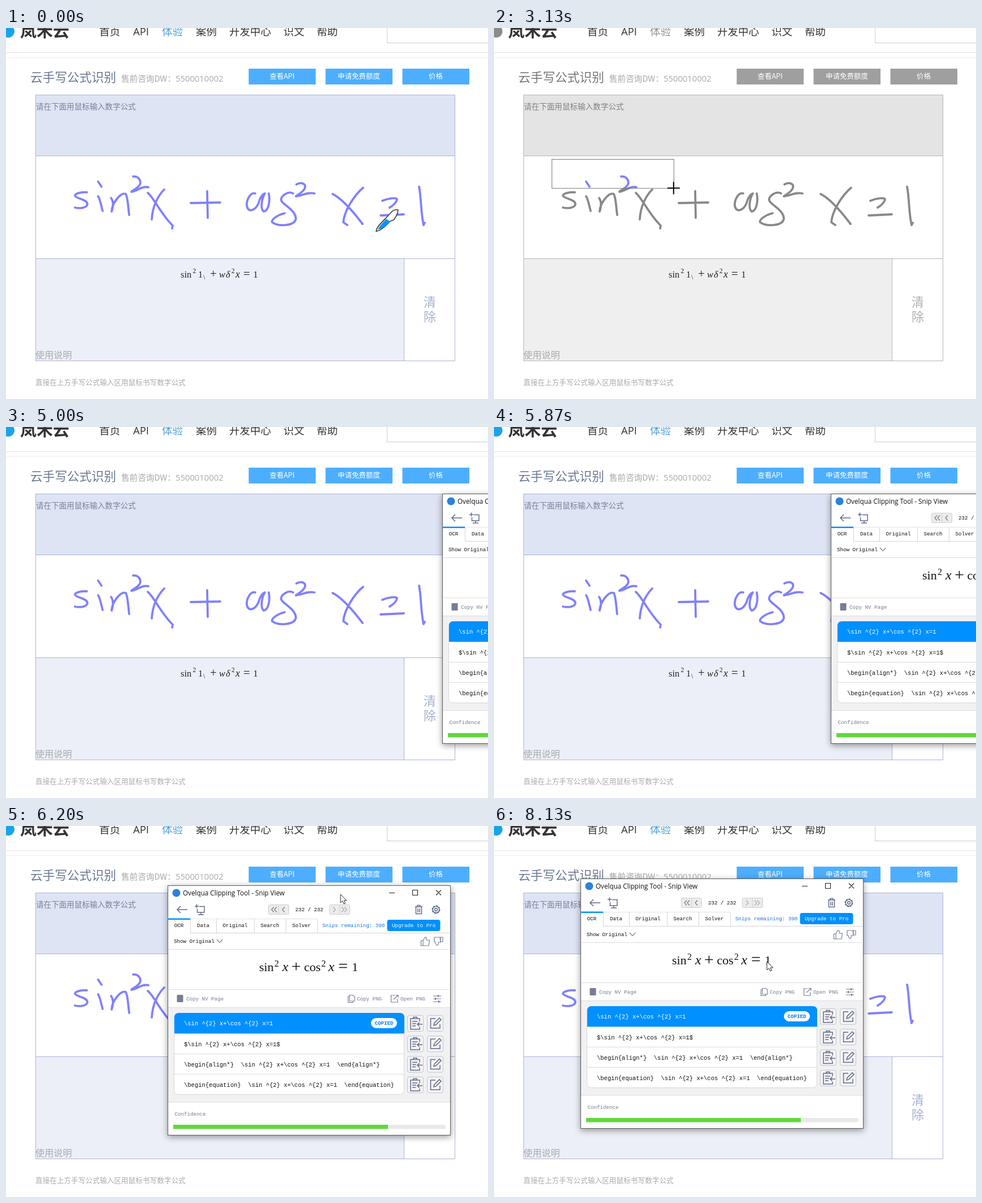
An HTML page for the animation above (8260 ms loop, 853 by 657 pixels).

```html
<!DOCTYPE html>
<html lang="zh">
<head>
<meta charset="utf-8">
<title>Formula snip</title>
<style>
html, body { margin: 0; width: 100%; height: 100%; overflow: hidden; background: #fff; }
svg { display: block; width: 853px; height: 657px; }
text { white-space: pre; font-family: "Noto Sans CJK SC", "Noto Sans CJK", sans-serif; }
.ui { font-family: "Open Sans", sans-serif; }
.mono { font-family: "Liberation Mono", monospace; }
.math { font-family: "Liberation Serif", serif; }
.it { font-style: italic; }
.b { font-weight: bold; }
.ico { fill: none; stroke: #626a86; stroke-width: 1.5; }
.muted .ico, .ico.thin { stroke: #777d96; stroke-width: 1.2; }
#window { filter: drop-shadow(0 3px 6px rgba(0, 0, 0, .4)); }
</style>
</head>
<body>
<svg id="stage" viewBox="0 0 853 657"></svg>
<script>
const LOOP = 8260, STEP = 200 / 3;

const text = (x, y, str, size, fill, cls = '', more = '') =>
  `<text x="${x}" y="${y}" font-size="${size}" fill="${fill}" class="${cls}" ${more}>${str}</text>`;
const rect = (x, y, w, h, fill, more = '') =>
  `<rect x="${x}" y="${y}" width="${w}" height="${h}" fill="${fill}" ${more}/>`;
const path = (d, more = 'class="ico"') => `<path d="${d}" ${more}/>`;
const line = (d, color) => path(d, `fill="none" stroke="${color}"`);
// Chinese text placed by its vertical centre
const han = (x, mid, str, size, fill, more) => text(x, mid + size * .38, str, size, fill, '', more);
const mono = (x, mid, str, fill = '#111', size = 9.2, cls = '') =>
  text(x, mid + size * .32, str, size, fill, 'mono ' + cls);

function nav() {
  const items = [[165, '首页'], [276, '体验'], [336, '案例'], [395, '开发中心'], [491, '识文'], [550, '帮助']];
  return '<circle cx="4" cy="6" r="11" fill="#1ba3e8"/>' +
    han(25, 4.5, '岚禾云', 29, '#333', 'font-weight="bold"') +
    items.map(([x, s]) => han(x, 6, s, 18.5, s === '体验' ? '#4a9fd8' : '#333')).join('') +
    text(225, 13, 'API', 18.5, '#333', 'ui') +
    rect(674.5, -10, 200, 36.5, '#fff', 'stroke="#ccc"') +
    line('M0 43.5H853', '#e2e2e2') + line('M0 52.5H853', '#f1f1f1');
}

function button(x, label) {
  return rect(x, 72, 118.5, 28, '#4daeff') +
    han(x + 59, 85.5, label, 12.5, '#fff', 'text-anchor="middle"');
}

function panel() {
  const edge = '#aeb5d6';
  return rect(52.5, 118.5, 742, 471, '#fff') +
    rect(52.5, 118.5, 742, 108, '#dee4f4') +
    rect(52.5, 408.5, 652, 181, '#eceff7') +
    path('M52.5 118.5H794.5V589.5H52.5ZM52.5 226.5H794.5M52.5 408.5H794.5M704.5 408.5V589.5',
      `fill="none" stroke="${edge}"`) +
    han(53, 139, '请在下面用鼠标输入数字公式', 13.6, '#77829a') +
    han(52, 579, '使用说明', 16.2, '#a9abb0') +
    han(739, 485, '清', 22, '#a6b0d0') + han(739, 511, '除', 22, '#a6b0d0');
}

function result() {
  const m = (x, s, cls = '', y = 441.5, size = 16.5) => text(x, y, s, size, '#222', 'math ' + cls);
  return m(309, 'sin') + m(330.5, '2', '', 434, 11.5) + m(340, '1') + m(349, '\\', '', 445, 12) +
    m(361, '+', '', 442, 21) + m(377, 'w', 'it') + m(389, 'δ', 'it') + m(399, '2', '', 434, 11.5) +
    m(406, 'x', 'it', 441.5, 18) + m(420, '=', '', 442, 21) + m(437.5, '1');
}

function handwriting() {
  const strokes = [
    'M143 291C134 290 122 293 122 297C125 303 144 303 144 312C143 319 130 320 122 318',
    'M163 272L169 281M163 298C167 304 168 314 171 324',
    'M186 301C190 307 190 316 187 325C187 311 203 290 212 294C216 301 216 318 218 331',
    'M225 263C233 262 240 269 237 277C234 284 224 287 222 290C231 290 240 279 252 282',
    'M251 292C262 301 273 328 295 350L294 355M280 286C268 298 259 317 258 339',
    'M327 310L379 309M356 289L357 336',
    'M441 293C434 291 426 301 426 314C428 328 441 324 447 310C449 301 454 294 458 293' +
      'C452 303 450 320 456 325C464 324 468 308 465 293',
    'M508 293C500 288 486 297 487 305C489 313 513 322 513 338C510 351 482 352 471 344C469 339 481 331 493 328',
    'M514 277C523 272 531 276 529 283C527 290 517 295 513 298C524 298 531 290 546 293',
    'M578 294C595 302 615 326 631 347M632 283C616 296 598 325 597 344L604 349',
    'M666 306C675 302 692 299 692 304C690 310 684 315 679 318M663 332L704 330',
    'M731 281C735 300 734 328 739 349L741 345'
  ];
  return path(strokes.join(''),
    'fill="none" stroke="#8080ff" stroke-width="3.8" stroke-linecap="round" stroke-linejoin="round"');
}

const page = () => rect(0, 0, 853, 657, '#fff') + nav() +
  han(43, 87, '云手写公式识别', 21.7, '#6b7892') +
  han(204, 89.5, '售前咨询DW：', 14.6, '#a8a8a8') + text(300, 95, '5500010002', 14.8, '#a8a8a8', 'ui') +
  button(429.5, '查看API') + button(565.5, '申请免费额度') + button(701.5, '价格') +
  panel() + result() + handwriting() +
  han(52, 627, '直接在上方手写公式输入区用鼠标书写数字公式', 12.67, '#aaa');

function titleBar() {
  return '<circle cx="15.5" cy="13.5" r="7" fill="#2a82dc"/>' +
    text(27, 17.5, 'Ovelqua Clipping Tool - Snip View', 11.7, '#111', 'ui') +
    path('M392 13.5H402M433.5 8.5H442.5V17.5H433.5ZM475 8.5L484 17.5M484 8.5L475 17.5',
      'fill="none" stroke="#222" stroke-width="1.1"');
}

function toolBar() {
  const pager = (x, color, d) => rect(x + .5, 34.5, 36, 17, '#ececee', 'rx="2" stroke="#cfcfd3"') +
    line(`M${x + 18.5} 35V52`, '#cfcfd3') + path(d, `fill="none" stroke="${color}" stroke-width="1.2"`);
  return path('M35 43H17M23 37L17 43L23 49', 'class="ico" stroke-width="2"') +
    path('M56 37.5H65V48H52.5V42M48 37H55M51.5 33.5V40.5M59 48V52M54 52H64') +
    pager(178, '#777', 'M188 38.5L184 43L188 47.5M193 38.5L189 43L193 47.5M207 38.5L203 43L207 47.5') +
    mono(226, 43, '232 / 232') +
    pager(286, '#aaa', 'M293 38.5L297 43L293 47.5M308 38.5L312 43L308 47.5M313 38.5L317 43L313 47.5') +
    path('M438 38H451M442 38V35.5H447V38M439.5 38V50.5H449.5V38M443 41V48M446 41V48') +
    '<circle cx="475" cy="43" r="6.7" class="ico" stroke-dasharray="3.2 2"/>' +
    '<circle cx="475" cy="43" r="5.8" class="ico"/><circle cx="475" cy="43" r="2.4" class="ico"/>';
}

function tabs() {
  const edges = [40, 86, 153, 209, 265], names = ['OCR', 'Data', 'Original', 'Search', 'Solver'];
  return names.map((name, i) => {
    const left = i ? edges[i - 1] : 0;
    return mono((left + edges[i]) / 2 - name.length * 2.76, 71, name) +
      line(`M${edges[i] + .5} 60V84`, '#d5d5d8');
  }).join('') + line('M40 84.5H499', '#d5d5d8') + line('M40 59.5H265', '#e2e2e4') +
    rect(0, 58.5, 40, 2.5, '#0090ff') +
    mono(274, 71, 'Snips remaining: 390', '#1676e8') +
    rect(388.5, 61, 94, 20, '#0090ff', 'rx="4"') + mono(397, 71, 'Upgrade to Pro', '#fff') +
    mono(11, 99, 'Show Original') + path('M87 96L92 101.5L97.5 96', 'class="ico thin"') +
    path('M448.500 98H452V107H448.500ZM452 98L455.5 92Q459 91 458 97H463.5L462 107H452' +
      'M472 92H482L483 101H479Q480 107 476 106L473.500 100.500H472ZM483 92H487V100H483Z', 'class="ico thin"') +
    line('M2 113.5H498', '#dcdce0');
}

function formula() {
  const m = (x, s, cls = '', y = 152, size = 22) => text(x, y, s, size, '#111', 'math ' + cls);
  return m(162, 'sin') + m(189, '2', '', 144, 16) + m(203, 'x', 'it', 152, 24) + m(219, '+', '', 153, 30) +
    m(241.5, 'cos') + m(272, '2', '', 144, 16) + m(284.5, 'x', 'it', 152, 24) +
    m(302, '=', '', 153, 30) + m(326, '1');
}

function copyRow() {
  const gray = '#747a92';
  return line('M2 184.5H498', '#dcdce0') +
    `<g class="flash">${rect(16.5, 194, 11, 13, '#777d96', 'rx="1"') + mono(33, 201, 'Copy NV Page', gray)}</g>` +
    path('M322 194.5H328L331 197.5V205H322ZM322 197H319.500V207.500H328V205' +
      'M402 195H395.500V207H407V201M400 202L408 194.500M403.500 194.500H408V199' +
      'M470 196H484M470 201H484M470 206H484', 'class="ico thin"') +
    path('M479 194V198M474 199V203M480 204V208', 'class="ico"') +
    mono(335, 201, 'Copy PNG', gray) + mono(412, 201, 'Open PNG', gray);
}

function snippets() {
  const tex = '\\sin ^{2} x+\\cos ^{2} x=1';
  const rows = [tex, `$${tex}$`, `\\begin{align*}  ${tex}  \\end{align*}`, `\\begin{equation}  ${tex}  \\end{equation}`];
  const side = i => `<g transform="translate(0 ${i * 36.3})">` +
    rect(424.500, 230.500, 28, 28, '#f3f3f5', 'rx="3" stroke="#c3c4ca"') +
    rect(459.500, 230.500, 28, 28, '#f3f3f5', 'rx="3" stroke="#c3c4ca"') +
    path('M446 241V236H430V255H446V251M435 236V233.500H441V236M433 241H442M433 245H440M433 249H439M451 246H442M445.500 242.500L442 246L445.500 249.500') +
    path('M474 236H465.500V253H482V246M471 248L472 244L481 235L484 238L475 247Z', 'class="ico" stroke-width="1.8"') +
    '</g>';
  return rect(1, 216, 499, 166, '#f1f1f3') + line('M1 216.5H499', '#dcdce0') +
    rect(11.5, 226.5, 407, 144, '#fff', 'rx="8" stroke="#d8d8dc"') +
    line('M12 298.5H418M12 334.5H418', '#dcdce0') +
    '<g class="flash">' + path('M12 262.500V234Q12 226 20 226H411Q419 226 419 234V262.500Z', 'fill="#0090ff"') +
    rect(360, 235, 46, 18, '#fff', 'rx="9"') + mono(366.5, 244.5, 'COPIED', '#0080f0', 9.2, 'b') + '</g>' +
    rows.map((s, i) => mono(29, 245 + i * 36.2, s, i ? '#111' : '#fff', 10.5) + side(i)).join('');
}

const snipWindow = () => rect(.5, .5, 500, 442, '#fff', 'stroke="#5c5c60"') +
  titleBar() + toolBar() + tabs() + formula() + copyRow() + snippets() +
  line('M1 383.5H500', '#cfcfd3') + mono(12.5, 405.5, 'Confidence', '#747a92') +
  rect(10, 424, 482, 7.5, '#e9e9e9', 'rx="2"') + rect(10, 424, 380, 7.5, '#62d83c');

const stage = document.getElementById('stage');
stage.innerHTML = `
  <clipPath id="area"><rect id="areaRect"/></clipPath>
  <g id="backdrop"><g id="page">${page()}</g></g>
  <g id="selection"><use href="#page" clip-path="url(#area)"/><rect id="outline" fill="none" stroke="#777"/></g>
  <g id="window">${snipWindow()}</g>
  <g id="pen">
    ${path('M0 0C1 -7 8 -14 16 -22L28 -35C31 -38 37 -39 38.5 -38C39 -36 38 -32 35 -26L31 -20L25 -18C17 -9 8 -1 0 0Z',
      'fill="#fff" stroke="#444" stroke-width="1.8" stroke-linejoin="round"')}
    ${path('M3.5 -3.500C6 -10 12 -15 18 -22L25 -17C17 -9 10 -4 3.5 -3Z', 'fill="#0a94ff"')}
  </g>
  <g id="cross">${path('M-11 0H11M0 -11V11', 'stroke="#000" stroke-width="2"')}</g>
  <g id="arrow">${path('M0 0V15L3.500 11.800L6 17L8.500 16L6.200 11H10.800Z', 'fill="#fff" stroke="#222"')}</g>`;

const el = id => document.getElementById(id);
const flashing = document.querySelectorAll('.flash');
const show = (id, on) => el(id).style.display = on ? '' : 'none';
const place = (id, [x, y], more = '') => el(id).setAttribute('transform', `translate(${x} ${y})${more}`);
const smooth = u => u * u * (3 - 2 * u);

// Position along [step, x, y] stops
function track(stops, k, ease = u => u) {
  if (k <= stops[0][0]) return stops[0].slice(1);
  for (let i = 1; i < stops.length; i++) {
    const [k0, x0, y0] = stops[i - 1], [k1, x1, y1] = stops[i];
    if (k <= k1) {
      const u = ease((k - k0) / (k1 - k0));
      return [x0 + (x1 - x0) * u, y0 + (y1 - y0) * u];
    }
  }
  return stops[stops.length - 1].slice(1);
}

const penPath = [[0, 655, 360], [1, 643, 360], [2, 638, 360], [59, 638, 360], [60, 755, 387], [68, 755, 387], [69, 800, 382]];
const crossPath = [[31, 639, 359], [41, 102, 232], [42, 102, 232], [55, 756, 388]];
const windowPath = [[85, 772, 118], [86, 735, 118], [88, 596, 118], [90, 462, 113], [93, 286, 105],
  [94, 237, 101], [95, 193, 97], [96, 153, 93]];
const arrowPath = [[100, 460, 109], [101, 461, 105], [105, 483, 240]];

function draw(time) {
  const t = Math.floor(time % LOOP / 10) * 10;
  const k = Math.floor((t + 3.4) / STEP);
  const snipping = k >= 28 && k < 60;
  el('backdrop').style.filter = snipping ? 'grayscale(1)' : 'none';

  show('pen', k < 28 || k > 60 && k < 70);
  place('pen', track(penPath, k));

  const cross = track(crossPath, k, smooth);
  show('cross', snipping);
  place('cross', cross);

  const selecting = snipping && k > 42;
  show('selection', selecting);
  if (selecting) {
    const box = { x: 102.5, y: 232.5, width: cross[0] - 102, height: cross[1] - 232 };
    for (const id of ['areaRect', 'outline'])
      for (const key in box) el(id).setAttribute(key, box[key]);
  }

  const opened = Math.min(1, Math.max(0, (k - 69) / 5));
  const scale = .94 + .06 * smooth(opened);
  const spot = track(windowPath, k).map(Math.round);
  show('window', opened > 0);
  el('window').style.opacity = opened;
  place('window', spot, opened < 1 ? ` translate(250 221) scale(${scale}) translate(-250 -221)` : '');
  const glow = k >= 117 && k < 122 ? .85 + (k - 117) * .03 : 1;
  flashing.forEach(g => g.style.opacity = glow);

  show('arrow', k >= 86);
  place('arrow', k <= 96 ? [spot[0] + 306, spot[1] + 16] : track(arrowPath, k, smooth));
}

const start = performance.now();
(function tick() {
  draw(performance.now() - start);
  requestAnimationFrame(tick);
})();
</script>
</body>
</html>
```
